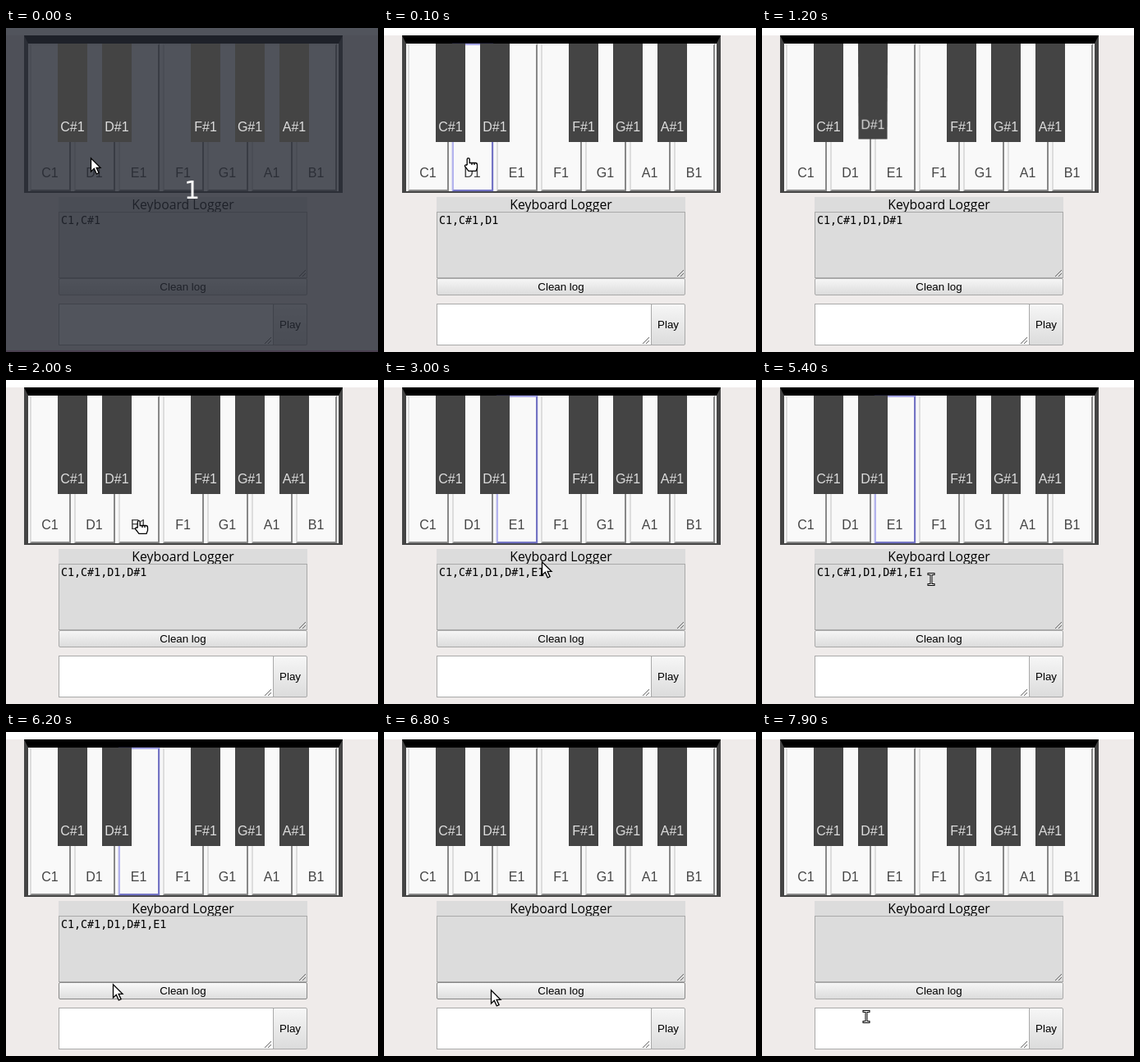
Animation of 453 by 395 pixels, one loop 8 s. Source, as an HTML page:

```html
<!DOCTYPE html>
<html lang="en">
<head>
<meta charset="utf-8">
<title>Piano with key logger</title>
<style>
html, body { margin: 0; width: 453px; height: 395px; overflow: hidden; background: #fff; }
body, #page { position: relative; }
body *, .key { box-sizing: border-box; }
#page, #page div, #shade, svg { position: absolute; }
#page { inset: 9px 0 0; background: #efebea; }
#stage { left: 0; top: -9px; width: 453px; height: 395px; }
#piano { left: 22px; top: 9px; width: 388px; height: 192px; background: #f7f7f7;
  border: solid #444; border-width: 10px 5px 2px; border-top-color: #000; }
#stage .key { top: 19px; text-align: center; font: 16px/18px "Liberation Sans", Arial, sans-serif; transform-origin: top; }
.white { width: 50px; height: 180px; padding: 147px 1px 0 0; color: #444; background: #f9f9f9;
  border: 2px solid; border-color: #eee #888 #888 #ddd; }
.black { width: 36px; height: 120px; padding-top: 93px; color: #ddd; background: #444; z-index: 1; }
.white.focus { border-color: #aaaae8 #7474c4 #7474c4 #b4b4ee; box-shadow: 0 0 1px #66c; }
.white.down { transform: perspective(1000px) rotateX(-5deg); }
.black.down { transform: perspective(400px) rotateX(-5deg); }
#title { left: 64px; top: 206px; width: 303px; height: 18px; background: #dcdcdc; text-align: center;
  font: 15.8px/18px "Open Sans", "Noto Sans", sans-serif; }
.area { left: 64px; border: 1px solid #a9a9a9; padding: 2px;
  font: 13.33px "DejaVu Sans Mono", monospace; }
#log { top: 224px; width: 303px; height: 81px; background: #dcdcdc; }
#notes { top: 336px; width: 262px; height: 51px; background: #fff; }
.button { border: 1px solid #a9a9a9; border-radius: 2px; text-align: center;
  background: linear-gradient(#f6f6f6, #dcdcdc); font: 13.33px/19px "Liberation Sans", Arial, sans-serif; }
#clean { left: 64px; top: 305px; width: 303px; height: 21px; }
#clean.hover { border-color: #888; background: linear-gradient(#f9f9f9, #dedede); }
#clean.down { background: linear-gradient(#d6d6d6, #eaeaea); }
#play { left: 325px; top: 336px; width: 42px; height: 51px; line-height: 49px; }
#shade { inset: 0; background: rgba(38, 42, 52, .8); border-bottom: 2px solid #4a4050; color: #fff;
  text-align: center; font: 30px/395px "DejaVu Sans", sans-serif; }
svg { left: 0; top: 0; }
</style>
</head>
<body>
<div id="page"><div id="stage">
  <div id="piano"></div>
  <div id="title">Keyboard Logger</div>
  <div id="log" class="area"></div>
  <div id="clean" class="button">Clean log</div>
  <div id="notes" class="area"></div>
  <div id="play" class="button">Play</div>
  <svg width="453" height="395" fill="none" stroke="#666">
    <path d="M357 303l8-8M361 303l4-4M315 385l8-8M319 385l4-4"/>
  </svg>
</div></div>
<div id="shade">1</div>
<svg width="453" height="395">
  <g id="cursor" stroke="#000">
    <path id="arrow" fill="#fff" stroke-width="1.3" d="M.5 .8V17l3.8-3.6 3 6.6 2.8-1.3-3-6.3H12z"/>
    <path id="hand" fill="#fff" stroke-width="1.3"
      d="M-1.8 9V2Q-1.8.6-.3.6T1.2 2V6.5H8.5Q10.5 6.5 10.5 9V12.5L9 16.4H0L-4.6 10.5Q-4.6 8-1.8 9.5M4 6.5V9M7 6.5V9"/>
    <g id="beam" fill="none" stroke-linecap="square">
      <path stroke-width="3" d="M-3-6.5H3M-3 6.5H3M0-6.5V6.5"/>
      <path stroke="#fff" d="M-3-6.5H3M-3 6.5H3M0-6.5V6.5"/>
    </g>
  </g>
</svg>
<script>
const LOOP = 8000, STEP = 100;
const $ = id => document.getElementById(id);
const keys = {};

function addKey(name, kind, left) {
  const key = document.createElement('div');
  key.className = 'key ' + kind;
  key.style.left = left + 'px';
  key.textContent = name + '1';
  $('stage').append(key);
  keys[name] = key;
}
[...'CDEFGAB'].forEach((note, i) => {
  addKey(note, 'white', 29 + 54 * i);
  if (!'EB'.includes(note)) addKey(note + '#', 'black', 63 + 54 * i);
});

// Pointer moves: start, end, target x, target y; it rests in between.
const moves = [
  [500, 600, 104, 164], [600, 1000, 138, 114], [1500, 2000, 162, 171],
  [2700, 3200, 212, 254], [3300, 3600, 183, 250], [3800, 4000, 139, 322],
  [4300, 4500, 189, 295], [4700, 4800, 191, 295], [5000, 5100, 207, 243],
  [5200, 5400, 206, 243], [5500, 5900, 141, 301], [6000, 6200, 130, 307],
  [6400, 6600, 130, 314], [7100, 7400, 126, 339], [7500, 7700, 117, 350],
  [7700, 7900, 127, 347]
];

function pointerAt(t) {
  let x = 103, y = 158;
  for (const [start, end, toX, toY] of moves) {
    const k = Math.min(1, Math.max(0, (t - start) / (end - start)));
    x += (toX - x) * k;
    y += (toY - y) * k;
  }
  return [Math.round(x), Math.round(y)];
}

function logAt(t) {
  if (t >= 6800) return '';
  return 'C1,C#1' + (t >= 100 ? ',D1' : '') + (t >= 1200 ? ',D#1' : '') + (t >= 2200 ? ',E1' : '');
}

function render(t) {
  const within = (from, to) => t >= from && t < to;
  const [x, y] = pointerAt(t);
  const shape = t < 100 ? 'arrow' : y < 199 ? 'hand'
    : (y > 224 && y < 305) || y > 335 ? 'beam' : 'arrow';
  for (const id of ['arrow', 'hand', 'beam']) $(id).style.display = id === shape ? '' : 'none';
  $('cursor').setAttribute('transform', `translate(${x} ${y})`);

  $('shade').style.display = t < 100 ? '' : 'none';
  $('log').textContent = logAt(t);
  keys.D.classList.toggle('focus', within(100, 1200));
  keys.E.classList.toggle('focus', within(2200, 6600));
  keys['D#'].classList.toggle('down', within(1200, 1400));
  keys.E.classList.toggle('down', within(2200, 2500));
  $('clean').classList.toggle('hover', y >= 305 && y < 326);
  $('clean').classList.toggle('down', within(6600, 6800));
}

const begin = performance.now();
function tick() {
  const t = (performance.now() - begin) % LOOP;
  render(Math.floor(t / STEP) * STEP);
  requestAnimationFrame(tick);
}
tick();
</script>
</body>
</html>
```
